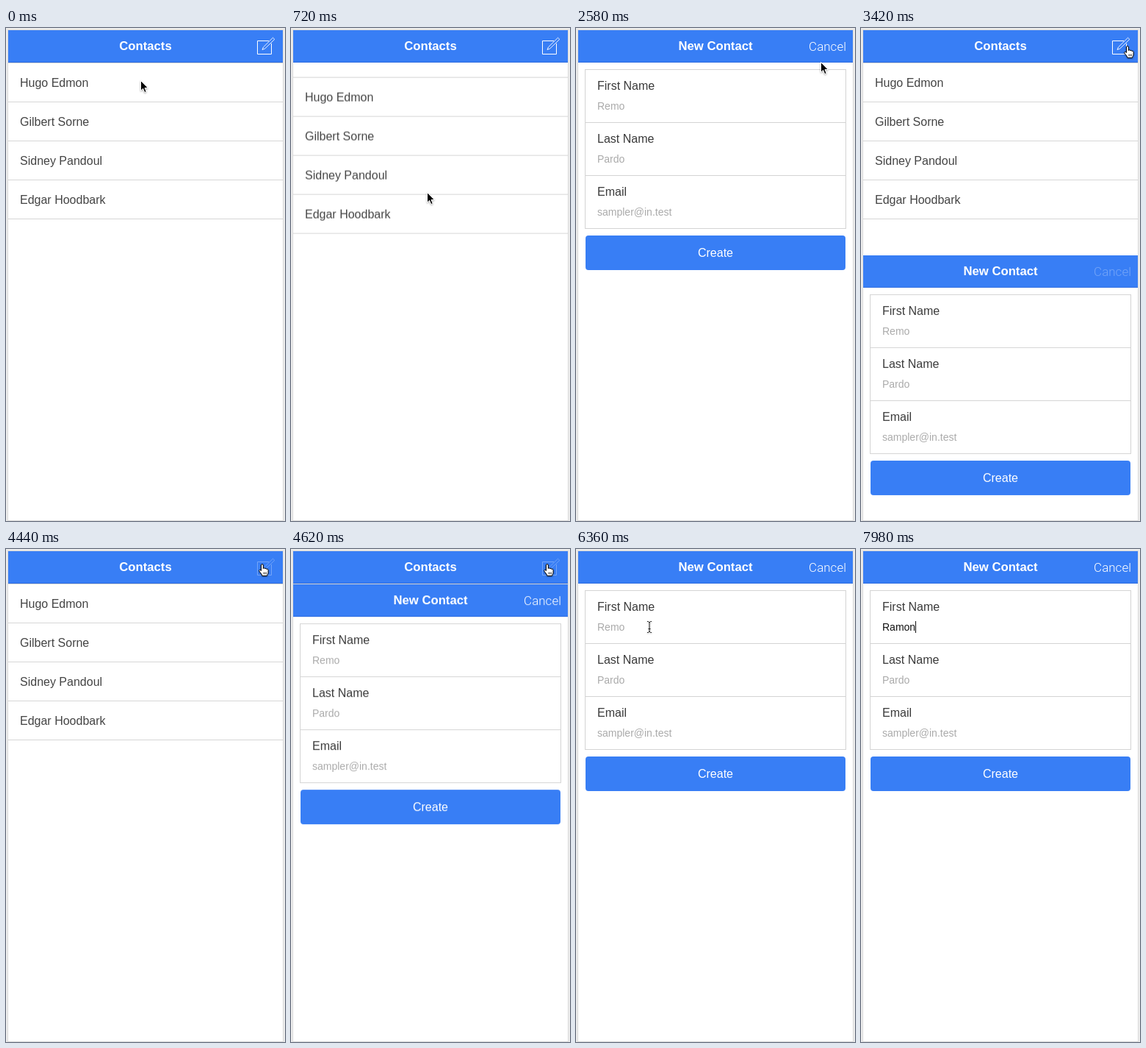
An HTML page that plays this animation: 380 px wide and 670 px high, repeating every 8000 ms.

```html
<!DOCTYPE html>
<html lang="en">
<head>
<meta charset="utf-8">
<title>Contacts</title>
<style>
  html, body { margin: 0; width: 100%; height: 100%; overflow: hidden; background: #ededed; }
  body { font: 16px "Liberation Sans", Arial, sans-serif; color: #444; }
  #stage { position: relative; width: 380px; height: 670px; overflow: hidden; }
  #screen {
    position: absolute; left: 3px; top: 3px; width: 374px; height: 666px;
    overflow: hidden; background: #fff; box-shadow: 0 0 0 1px #dadada;
  }
  header {
    position: absolute; left: 0; top: 0; width: 100%; height: 44px; box-sizing: border-box;
    background: #387ef5; border-bottom: 1px solid #2c6be0;
    color: #fff; font-size: 16.7px; font-weight: bold; line-height: 44px; text-align: center;
  }
  #compose { position: absolute; left: 335px; top: 6px; }
  #cancel { position: absolute; right: 9px; top: 0; font: 300 17px/44px Roboto, sans-serif; }
  .list { position: absolute; left: 0; top: 44px; width: 100%; will-change: transform; }
  .row { height: 52px; padding-left: 16px; line-height: 53px; border-top: 1px solid #d6d6d6; }
  .row:last-child { border-bottom: 1px solid #d6d6d6; }
  #modal { position: absolute; inset: 0; background: #fff; will-change: transform; }
  .card {
    position: absolute; left: 9px; top: 53px; width: 354px;
    border: 1px solid #d4d4d4; border-top: 0;
  }
  .field { position: relative; height: 71px; border-top: 1px solid #d4d4d4; }
  .field > * { position: absolute; left: 16px; white-space: pre; }
  .label { top: 11px; line-height: 21px; color: #3a3a3a; }
  .value { top: 39px; font-size: 14px; line-height: 20px; color: #aaa; }
  .value.typed { color: #111; }
  #caret { top: 41px; width: 1px; height: 16px; background: #111; }
  .create {
    position: absolute; left: 10px; top: 279px; width: 354px; height: 47px;
    border-radius: 4px; background: #387ef5; color: #fff; line-height: 47px; text-align: center;
  }
  .cursor { position: absolute; left: 0; top: 0; overflow: visible; filter: drop-shadow(0 1px 1px #0005); }
</style>
</head>
<body>
<div id="stage">
  <div id="screen">
    <div class="list" id="list"></div>
    <header>Contacts
      <svg id="compose" width="32" height="32" fill="none" stroke="#fff">
        <path d="M20 8.5H4.5V26.5H23.5V12"/>
        <path d="M11 20.5L12.5 17 25.5 4.2 27.8 6.4 14.7 19Z" stroke-width=".9"/>
      </svg>
    </header>
    <div id="modal">
      <header>New Contact<span id="cancel">Cancel</span></header>
      <div class="card" id="card"></div>
      <div class="create">Create</div>
    </div>
  </div>
  <svg class="cursor" id="arrow" width="14" height="20">
    <path d="M.5 .5V14.2L3.6 11.3 5.8 16.6 8.2 15.6 6 10.5H10.3Z" fill="#000" stroke="#fff"/>
  </svg>
  <svg class="cursor" id="hand" width="16" height="19">
    <path d="M3.5 9.5V2a1.4 1.4 0 0 1 2.8 0V6.6c.2-1.2 2.5-1 2.5.4 .3-1 2.3-.7 2.3.7 .4-.9 2-.5 2 .8V12c0 2-1.5 2.5-1.5 4.5H5C5 14.5 1.5 11.5 .8 9.8c-.5-1.4 1.2-2 2.7-.3Z" fill="#fff" stroke="#000"/>
    <path d="M6.9 11.5v3M8.7 11.5v3M10.4 11.5v3" stroke="#000" stroke-width=".7"/>
  </svg>
  <svg class="cursor" id="beam" width="8" height="17" fill="none" stroke="#222">
    <path d="M1 .5H2.5L4 2 5.5 .5H7M4 2V14M1 15.5H2.5L4 14 5.5 15.5H7M2.5 10.5H5.5"/>
  </svg>
</div>
<script>
const $ = id => document.getElementById(id);
const LOOP = 8000, STEP = 60, TRAVEL = 667;

const contacts = ["Hugo Edmon", "Gilbert Sorne", "Sidney Pandoul", "Edgar Hoodbark"];
const fields = [["First Name", "Remo"], ["Last Name", "Pardo"], ["Email", "sampler@in.test"]];
const typing = { text: "Ramon", focus: 5820, keys: [6960, 7200, 7380, 7620, 7860] };

$("list").innerHTML = contacts.map(name => `<div class="row">${name}</div>`).join("");
$("card").innerHTML = fields.map(([label, hint]) =>
  `<div class="field"><span class="label">${label}</span><span class="value">${hint}</span></div>`).join("");
const firstField = document.querySelector(".field");
const firstValue = firstField.querySelector(".value");
const caret = document.createElement("i");
caret.id = "caret";
firstField.append(caret);

// time, x, y of the pointer tip
const path = [
  [0, 183, 71], [120, 183, 71], [480, 185, 215], [720, 185, 223], [900, 186, 222],
  [1500, 352, 23], [1920, 352, 23], [2400, 335, 44], [2580, 333, 46], [2760, 333, 46],
  [3060, 364, 24], [3360, 364, 24], [3720, 356, 22], [3900, 356, 22], [4200, 349, 20],
  [4860, 349, 20], [5520, 110, 98], [5760, 100, 98], [LOOP, 100, 98]
];

const clamp = v => Math.min(1, Math.max(0, v));
const between = (t, from, to) => t >= from && t < to;

function bezier(x1, y1, x2, y2) {
  const at = (a, b, s) => 3 * a * s * (1 - s) ** 2 + 3 * b * s * s * (1 - s) + s ** 3;
  return x => {
    let lo = 0, hi = 1;
    for (let i = 0; i < 24; i++) {
      const mid = (lo + hi) / 2;
      if (at(x1, x2, mid) < x) lo = mid; else hi = mid;
    }
    return at(y1, y2, lo);
  };
}
const slideIn = bezier(.1, .7, .1, 1);
const slideOut = bezier(.42, 0, .58, 1);

// start, duration, direction of each modal slide
const slides = [[1711, 335, "in"], [3301, 250, "out"], [4470, 335, "in"]];

function modalOffset(t) {
  const slide = slides.filter(([start]) => t >= start).pop();
  if (!slide) return TRAVEL;
  const [start, duration, direction] = slide;
  const p = clamp((t - start) / duration);
  if (p === 1) return direction === "in" ? 0 : TRAVEL;
  return TRAVEL * (direction === "in" ? 1 - slideIn(p) : slideOut(p));
}

function pointer(t) {
  const i = path.findIndex(([time]) => time > t);
  const [t0, x0, y0] = path[i - 1], [t1, x1, y1] = path[i];
  const p = (t - t0) / (t1 - t0), e = p * p * (3 - 2 * p);
  return [x0 + (x1 - x0) * e, y0 + (y1 - y0) * e];
}

// The list follows a drag at half speed, then springs back.
function listOffset(t) {
  if (t < 500) return (pointer(t)[1] - 71) / 2;
  return 72 * (1 - clamp((t - 500) / 460)) ** 2;
}

function place(node, x, y) {
  node.style.transform = `translate(${x}px, ${y}px)`;
}

function drawCursor(t) {
  const [x, y] = pointer(t);
  let kind = "arrow";
  if (x > 338 && y < 42) kind = "hand";
  else if (t > 4860 && y > 88) kind = "beam";
  if (t >= typing.keys[0]) kind = "";
  for (const id of ["arrow", "hand", "beam"]) $(id).style.display = id === kind ? "" : "none";
  if (kind) place($(kind), Math.round(x) - { arrow: 0, hand: 5, beam: 4 }[kind], Math.round(y));
}

function drawField(t) {
  const count = typing.keys.filter(time => t >= time).length;
  const typed = typing.text.slice(0, count);
  firstValue.textContent = typed || fields[0][1];
  firstValue.classList.toggle("typed", count > 0);
  const shown = t >= typing.focus && (count > 0 || (t - typing.focus) % 1000 < 500);
  caret.style.display = shown ? "" : "none";
  place(caret, count ? firstValue.offsetWidth : 0, 0);
}

function render(t) {
  place($("list"), 0, listOffset(t));
  place($("modal"), 0, modalOffset(t));
  $("compose").style.opacity = between(t, 1620, 2100) || between(t, 4380, 4860) ? .3 : 1;
  $("cancel").style.opacity = between(t, 3180, 3480) ? .3 : 1;
  drawField(t);
  drawCursor(t);
}

const begin = performance.now();
function frame() {
  const t = Math.max(0, performance.now() - begin) % LOOP;
  render(Math.floor(t / STEP) * STEP);
  requestAnimationFrame(frame);
}
frame();
</script>
</body>
</html>
```
